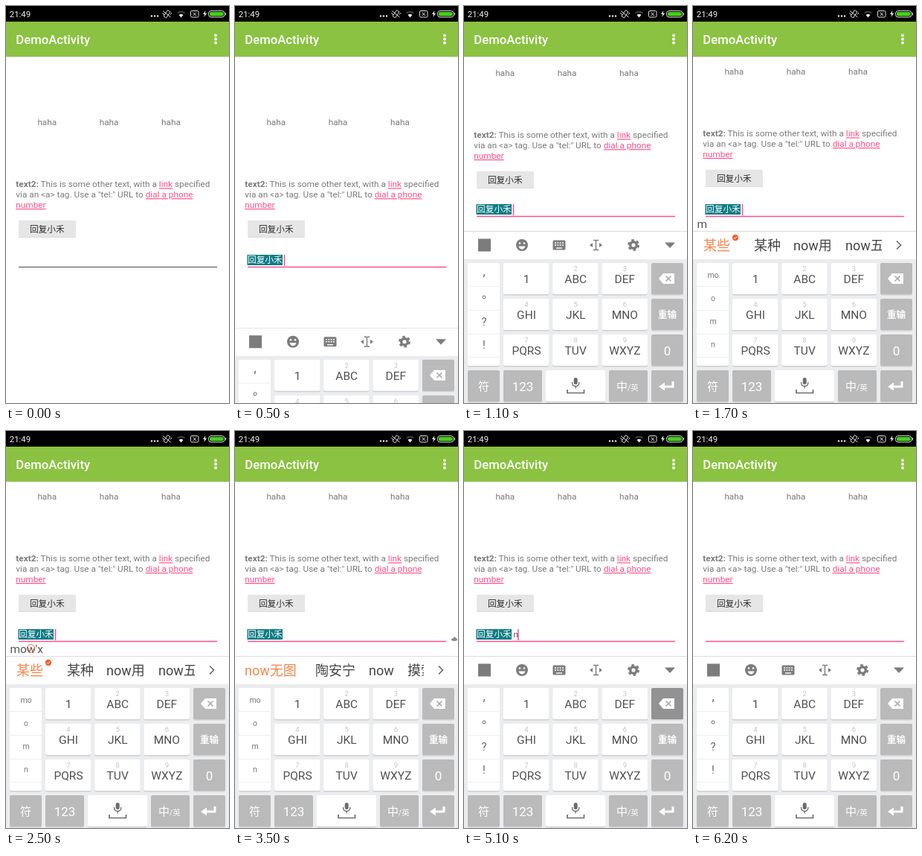
An HTML page for the animation above (6600 ms loop, 300x533 px).

```html
<!DOCTYPE html>
<html lang="zh">
<head>
<meta charset="utf-8">
<title>Mention editing demo</title>
<style>
  html, body { margin: 0; width: 100%; height: 100%; overflow: hidden; background: #fff; }
  svg { display: block; width: 100vw; height: 100vh; }
  text { font-family: Roboto, "Noto Sans CJK SC", "Noto Sans CJK", sans-serif; white-space: pre; }
  .mid { text-anchor: middle; }
  .body { font-size: 11.8px; fill: #7a7a7a; }
  .link { fill: #ff4f86; text-decoration: underline; }
  .label { font-size: 15.5px; fill: #505050; }
  .digit { font-size: 9.5px; fill: #c4c4c4; }
  .fn { fill: #fff; }
  .cand { font-size: 18px; fill: #454545; }
  .cand.first { fill: #f68549; }
  .icon { fill: #7c7c7c; }
  .before, .after, #keyboard { animation: 6.6s linear infinite; }
  .before { animation-name: leave; }
  .after { animation-name: enter; }
  #keyboard { animation-name: rise; }
  @keyframes leave { 0%, 9.09% { opacity: 1; } 12.12%, 100% { opacity: 0; } }
  @keyframes enter { 0%, 9.09% { opacity: 0; } 12.12%, 100% { opacity: 1; } }
  @keyframes rise {
    0%, 6.06% { transform: translateY(231px); animation-timing-function: cubic-bezier(.25, .46, .45, .94); }
    12.42%, 100% { transform: translateY(0); }
  }
</style>
</head>
<body>
<svg viewBox="0 0 300 533" preserveAspectRatio="none">
  <defs>
    <clipPath id="candClip"><rect x="0" y="303" width="254" height="37"/></clipPath>
    <g id="page">
      <g class="body mid">
        <text x="55.3" y="160.4">haha</text>
        <text x="138.6" y="160.4">haha</text>
        <text x="221.9" y="160.4">haha</text>
      </g>
      <g class="body">
        <text x="13.3" y="243.4"><tspan font-weight="700">text2:</tspan> This is some other text, with a <tspan class="link">link</tspan> specified</text>
        <text x="13.3" y="257.2">via an &lt;a&gt; tag. Use a "tel:" URL to <tspan class="link">dial a phone</tspan></text>
        <text x="13.3" y="271" class="link">number</text>
      </g>
      <rect x="17" y="288.5" width="77" height="22.5" rx="1" fill="#d6d6d6"/>
      <rect x="17" y="287.7" width="77" height="22.5" rx="1" fill="#e6e6e6"/>
      <text class="mid" x="55.3" y="304" font-size="11.7" fill="#2b2b2b">回复小禾</text>
    </g>
    <g id="mention">
      <rect x="16.5" y="266" width="47.5" height="14" fill="#0e7c86"/>
      <text x="17" y="277" font-size="11.7" fill="#fff">回复小禾</text>
    </g>
    <path id="focusLine" d="M17 282.5H284" stroke="#ff4f86" stroke-width="1.7"/>
  </defs>

  <rect width="300" height="533" fill="#fff"/>

  <g class="before">
    <use href="#page"/>
    <path id="idleLine" d="M17 350.5H284" stroke="#4a4a4a"/>
    <g id="idleEdit" transform="translate(0 68)">
      <use href="#mention"/>
      <use href="#focusLine"/>
      <path d="M66.5 266V281" stroke="#ff4f86" stroke-width="1.5"/>
    </g>
  </g>

  <g class="after">
    <use id="scrolled" href="#page"/>
    <use id="tag" href="#mention"/>
    <text id="tail" x="66.5" y="277" font-size="11.7" fill="#555"></text>
    <path id="caret" d="M0 266V281" stroke="#ff4f86" stroke-width="1.5"/>
    <use href="#focusLine"/>
    <path id="knob" d="M291 281q0-3 3-3q1-4 3 0q2 0 2 3q-4 2-8 0z" fill="#8a8a8a"/>
  </g>

  <g id="keyboard">
    <rect y="302" width="300" height="38" fill="#fff"/>
    <path d="M0 302.5H300" stroke="#dcdcdc"/>
    <rect y="340" width="300" height="193" fill="#ebecee"/>

    <g id="toolbar" class="icon">
      <rect x="19" y="312.5" width="17" height="17"/>
      <circle cx="78" cy="321" r="8"/>
      <g fill="#fff">
        <circle cx="75" cy="318.5" r="1.3"/><circle cx="81" cy="318.5" r="1.3"/>
        <path d="M73.5 322.5h9q-1.3 4-4.5 4t-4.5-4z"/>
      </g>
      <rect x="119.5" y="314.5" width="17" height="13" rx="1.5"/>
      <path d="M122 318h12M122 321h12" stroke="#fff" stroke-width="1.6" stroke-dasharray="2 1.33"/>
      <path d="M124 325h8" stroke="#fff" stroke-width="1.4"/>
      <path d="M174 314.5h2.5l1 1l1-1h2.5M177.5 315v12M174 327.5h2.5l1-1l1 1h2.5" fill="none" stroke="#7c7c7c" stroke-width="1.4"/>
      <path d="M173 318v6l-4-3zM182 318v6l4-3z"/>
      <circle cx="228" cy="321" r="6"/>
      <circle cx="228" cy="321" r="6.5" fill="none" stroke="#7c7c7c" stroke-width="3" stroke-dasharray="3.4 3.4"/>
      <circle cx="228" cy="321" r="2.6" fill="#fff"/>
      <path d="M270 317.5h14l-7 7.5z"/>
    </g>

    <g id="candidates">
      <g id="words" clip-path="url(#candClip)"></g>
      <g id="badge">
        <circle cx="57" cy="311" r="4.2" fill="#f4622c"/>
        <path d="M55 311l1.5 1.5l2.7-3" fill="none" stroke="#fff"/>
      </g>
      <path d="M274 315.5l5.5 5.5l-5.5 5.5" fill="none" stroke="#666" stroke-width="1.6"/>
    </g>

    <g id="keys"></g>
    <g id="marks" class="mid" fill="#666">
      <text x="27" y="362" font-size="16">,</text>
      <circle cx="27" cy="391" r="2" fill="none" stroke="#666"/>
      <text x="27" y="429" font-size="15">?</text>
      <text x="27" y="460" font-size="15">!</text>
    </g>
    <g id="syllables" class="mid" fill="#777" font-size="10.5">
      <text x="27" y="365">mo</text><text x="27" y="396">o</text>
      <text x="27" y="427">m</text><text x="27" y="458">n</text>
    </g>
    <path d="M5 376.5h43M5 408.5h43M5 440.5h43M5 471.5h43" stroke="#efefef"/>

    <path d="M262 366l6-7h15v14h-15z" fill="#fff"/>
    <path d="M271.5 362.5l7 7m0-7l-7 7" stroke="#a8a8a8" stroke-width="1.6"/>
    <path d="M281 504v7h-12" fill="none" stroke="#fff" stroke-width="3"/>
    <path d="M270 505.5v11l-8-5.5z" fill="#fff"/>
    <g fill="none" stroke="#6c6c6c">
      <rect x="147.7" y="499" width="5" height="9" rx="2.5" fill="#6c6c6c" stroke="none"/>
      <path d="M145.5 505q0 5.5 4.7 5.5t4.7-5.5M150.2 510.5v3" stroke-width="1.3"/>
      <path d="M139 515v4.5h22.5v-4.5" stroke-width="1.7"/>
    </g>

    <g id="compose">
      <rect id="composeBox" y="284" height="18" fill="#fff"/>
      <text id="composeText" x="5.5" y="298" font-size="15.5" fill="#555"></text>
      <circle id="ring" cx="33.5" cy="292" r="5.3" fill="none" stroke="#f4622c"/>
    </g>
  </g>

  <rect y="68" width="300" height="1" fill="#000" opacity=".1"/>
  <rect y="21" width="300" height="47" fill="#8bc241"/>
  <text x="13.3" y="51" font-size="16.7" font-weight="500" fill="#fff">DemoActivity</text>
  <g fill="#fff">
    <circle cx="282" cy="39.5" r="2"/><circle cx="282" cy="44.5" r="2"/><circle cx="282" cy="49.5" r="2"/>
  </g>

  <rect width="300" height="21" fill="#000"/>
  <text x="4.8" y="15" font-size="11.4" fill="#f2f2f2">21:49</text>
  <g fill="#e8e8e8">
    <circle cx="196" cy="13.5" r="1.2"/><circle cx="200" cy="13.5" r="1.2"/><circle cx="204" cy="13.5" r="1.2"/>
    <path d="M230 9q5.5-4.5 11 0l-1.2 1.3q-4.3-3.5-8.6 0z" opacity=".3"/>
    <path d="M232.5 12q3-2.5 6 0l-3 3.5z"/>
    <path d="M268.5 6l-3.5 5h2.2l-1 4l4-5.2h-2.4z"/>
  </g>
  <g fill="none" stroke="#e0e0e0">
    <path d="M217.5 5.5l3.5 2.5l-5.5 8l-3.5-2.5zM210.5 9l2 3M221 11.5l2-2.5M211 6.5l10.5 8.5"/>
    <rect x="248.5" y="6.5" width="10.5" height="8.5" rx="1.5"/>
    <path d="M251.5 8.5l4.5 4.5m0-4.5l-4.5 4.5"/>
    <rect x="272.5" y="6.5" width="21.5" height="8.5" rx="3.5"/>
    <path d="M295.5 9v3.5"/>
  </g>
  <rect x="274" y="8" width="18.5" height="5.5" rx="2" fill="#45cf1b"/>
</svg>

<script>
const LOOP = 6600;
const FN = '#bababb', PRESSED = '#929293';
const $ = id => document.getElementById(id);

function add(parent, tag, attrs, content = '') {
  const node = document.createElementNS('http://www.w3.org/2000/svg', tag);
  for (const name in attrs) node.setAttribute(name, attrs[name]);
  node.textContent = content;
  parent.append(node);
  return node;
}

function key(x, y, w, h, fill = '#fff') {
  add($('keys'), 'rect', { x, y: y + 1.5, width: w, height: h, rx: 2, fill: '#cfd0d2' });
  return add($('keys'), 'rect', { x, y, width: w, height: h, rx: 2, fill });
}

function fnKey(x, y, w, label = '', size = 16, weight = 400) {
  const cap = key(x, y, w, 42, FN);
  add($('keys'), 'text', {
    class: 'fn mid', x: x + w / 2, y: y + 21.5 + size * .36, 'font-size': size, 'font-weight': weight
  }, label);
  return cap;
}

key(5, 345, 43, 138);
['1', 'ABC', 'DEF', 'GHI', 'JKL', 'MNO', 'PQRS', 'TUV', 'WXYZ'].forEach((label, i) => {
  const x = 53 + i % 3 * 66.2, y = 345 + Math.floor(i / 3) * 48;
  key(x, y, 61.5, 42);
  if (i) add($('keys'), 'text', { class: 'digit mid', x: x + 31, y: y + 11 }, i + 1);
  add($('keys'), 'text', { class: 'label mid', x: x + 31, y: y + 27 }, label);
});
const backspace = fnKey(252, 345, 43);
fnKey(252, 393, 43, '重输', 12.5, 700);
fnKey(252, 441, 43, '0', 17);
fnKey(5, 489, 43, '符', 15);
fnKey(53, 489, 52, '123', 17);
key(110, 489, 80, 42);
fnKey(195, 489, 52);
const lang = add($('keys'), 'text', { class: 'fn', x: 205, y: 515.5, 'font-size': 15 }, '中');
add(lang, 'tspan', { 'font-size': 10.5 }, '/英');
fnKey(252, 489, 43);

// Each row holds [x, word] pairs.
const rows = [
  [[14, '某些'], [82, '某种'], [135, 'now用'], [205, 'now五']],
  [[13, 'now无图'], [108, '陶安宁'], [180, 'now'], [232, '摸索']]
].map(row => {
  const group = add($('words'), 'g', {});
  row.forEach(([x, word], i) =>
    add(group, 'text', { class: i ? 'cand' : 'cand first', x, y: 327.5 }, word));
  return group;
});

// Timed text: [start in ms, value].
const tails = [[0, ''], [3900, 'now无图'], [4700, 'now无'], [4900, 'now'], [5000, 'no'], [5100, 'n'], [5200, '']];
const pinyin = [[0, ''], [1700, 'm'], [1900, 'mo'], [2100, 'mow'], [2400, "mow'x"], [3200, '']];

const at = (track, t) => track.findLast(step => step[0] <= t)[1];
const within = (t, from, to) => t >= from && t < to;
const show = (node, on) => { node.style.display = on ? '' : 'none'; };

function render(t) {
  const focused = t >= 300, hasTag = t < 5500, choosing = within(t, 1700, 3700);
  show($('idleLine'), !focused);
  show($('idleEdit'), focused);
  $('scrolled').setAttribute('y', t < 1700 ? -66 : -68);
  show($('tag'), hasTag);
  $('tail').textContent = at(tails, t);
  const end = hasTag ? 66.5 + $('tail').getComputedTextLength() : 18;
  $('caret').setAttribute('transform', `translate(${end} 0)`);
  show($('caret'), !within(t, 3200, 3900) && t < 6200);
  show($('knob'), within(t, 3400, 3700));

  show($('toolbar'), !choosing);
  show($('marks'), !choosing);
  show($('candidates'), choosing);
  show($('syllables'), choosing);
  show(rows[0], t < 2900);
  show(rows[1], t >= 2900);
  show($('badge'), t < 2900);
  backspace.setAttribute('fill', within(t, 4900, 5600) ? PRESSED : FN);

  const typed = at(pinyin, t);
  show($('compose'), typed);
  $('composeText').textContent = typed;
  $('composeBox').setAttribute('width', typed ? $('composeText').getComputedTextLength() + 9 : 0);
  show($('ring'), within(t, 2400, 2700));
}

let start;
function tick(now) {
  start ??= now;
  render((now - start) % LOOP);
  requestAnimationFrame(tick);
}
render(0);
requestAnimationFrame(tick);
</script>
</body>
</html>
```
